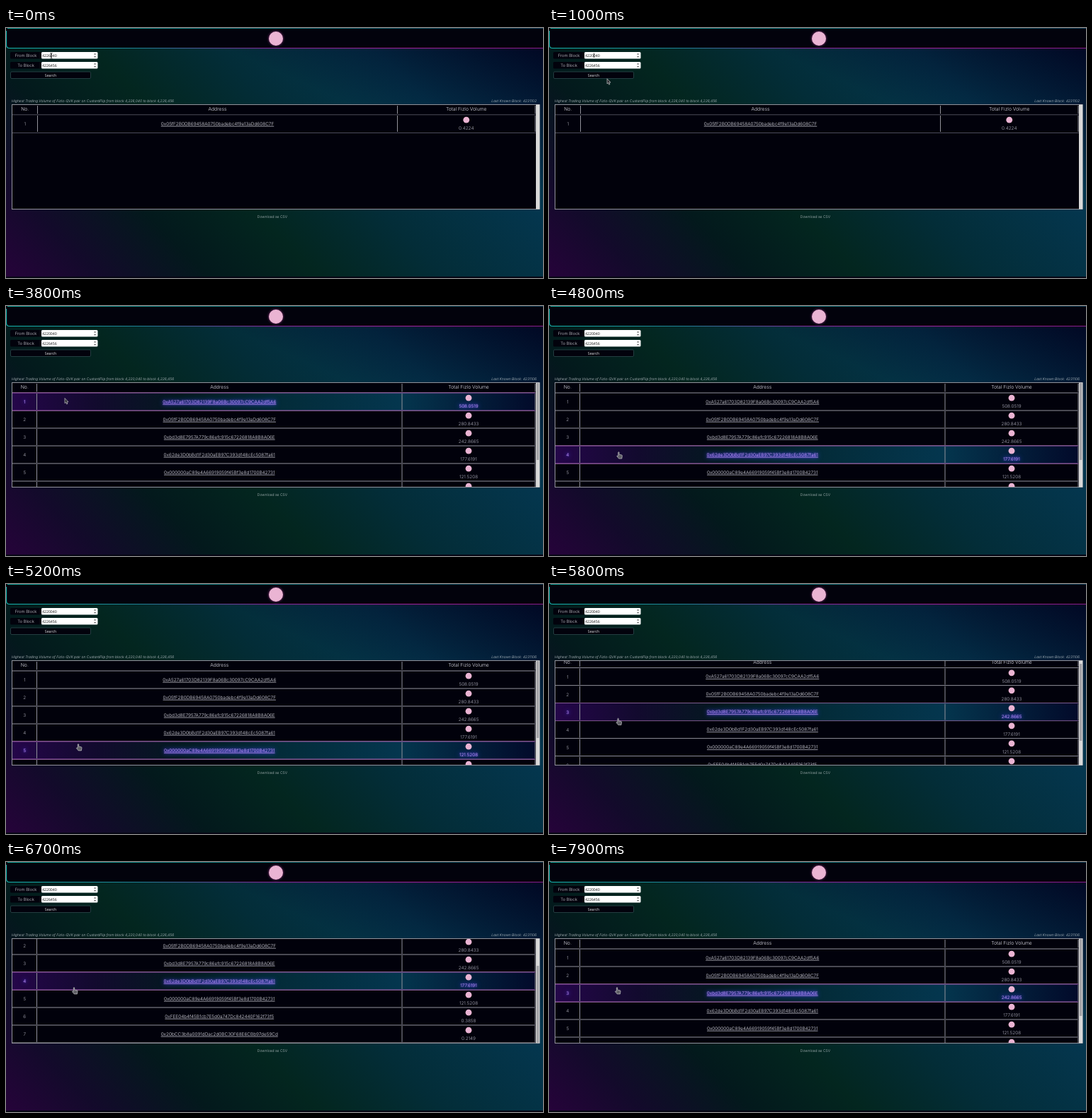
Recreate the animation shown at these times as an HTML page. Size 758 by 354 pixels, loop 8 s.

```html
<!DOCTYPE html>
<html lang="en">
<head>
<meta charset="utf-8">
<title>Trading volume search</title>
<style>
  html, body { margin: 0; width: 100%; height: 100%; overflow: hidden; background: #03151d; }
  svg { display: block; width: 758px; height: 354px; }
  text { font-family: Inter, "Open Sans", sans-serif; font-weight: 300; fill: #d6d6dc; text-rendering: geometricPrecision; }
  .head { font-size: 6.8px; fill: #e4e4e8; }
  .num { font-size: 6.4px; fill: #b4b4be; }
  .addr { font-size: 6.45px; fill: #e2e2e8; text-decoration: underline; text-decoration-thickness: .5px; }
  .label { font-size: 5.9px; }
  .field { font: 400 5.2px "Open Sans", "Noto Sans", sans-serif; fill: #111; }
  .note { font-size: 5px; font-style: italic; fill: #c4ccd0; }
  .small { font-size: 5.1px; fill: #b8c2c4; }
  .line { stroke: #92929a; stroke-width: 1; fill: none; }
  .dim { stroke: #4c4c58; }
  .token { fill: #eab4d3; }
  .glow { display: none; }
  .hover .glow { display: inline; }
  .hover text { fill: #cfa8ff; filter: drop-shadow(0 0 1px #7a45ff) drop-shadow(0 0 3px #3a45e8); }
</style>
</head>
<body>
<svg id="stage" viewBox="0 0 758 354" xmlns="http://www.w3.org/2000/svg">
  <defs>
    <linearGradient id="sky" gradientUnits="userSpaceOnUse" x1="101" y1="455" x2="657" y2="-101">
      <stop offset="0" stop-color="#26033a"/>
      <stop offset=".12" stop-color="#130a2b"/>
      <stop offset=".26" stop-color="#03191c"/>
      <stop offset=".4" stop-color="#03261f"/>
      <stop offset=".56" stop-color="#032d38"/>
      <stop offset=".76" stop-color="#04364e"/>
      <stop offset="1" stop-color="#03304a"/>
    </linearGradient>
    <linearGradient id="night" gradientUnits="userSpaceOnUse" x1="683" y1="197" x2="758" y2="30">
      <stop offset="0" stop-color="#010420" stop-opacity="0"/>
      <stop offset="1" stop-color="#010420" stop-opacity=".9"/>
    </linearGradient>
    <linearGradient id="edge" gradientUnits="userSpaceOnUse" x1="0" y1="0" x2="758" y2="0">
      <stop offset="0" stop-color="#15b5ac"/>
      <stop offset=".25" stop-color="#1f8296"/>
      <stop offset=".48" stop-color="#8a2a9c"/>
      <stop offset=".75" stop-color="#a8209a"/>
      <stop offset="1" stop-color="#8c1c88"/>
    </linearGradient>
    <linearGradient id="topEdge">
      <stop offset="0" stop-color="#15a59c"/>
      <stop offset="1" stop-color="#123a52"/>
    </linearGradient>
    <linearGradient id="rowFill">
      <stop offset="0" stop-color="#25064a"/>
      <stop offset=".16" stop-color="#120a2e"/>
      <stop offset=".32" stop-color="#03191f"/>
      <stop offset=".5" stop-color="#032b38"/>
      <stop offset=".74" stop-color="#04364e"/>
      <stop offset="1" stop-color="#020a2a"/>
    </linearGradient>
    <filter id="soft" x="-5%" y="-60%" width="110%" height="220%"><feGaussianBlur stdDeviation="1.2"/></filter>
    <filter id="halo" x="-50%" y="-50%" width="200%" height="200%"><feGaussianBlur stdDeviation="1.6"/></filter>
    <clipPath id="view"><rect x="8" y="108" width="740" height="149"/></clipPath>
  </defs>
</svg>
<script>
const stage = document.getElementById('stage');
const LOOP = 8000, STEP = 100, ROW_TOP = 123, ROW_H = 25, MAX_SCROLL = 42;

function add(parent, tag, attrs = {}, content) {
  const node = document.createElementNS('http://www.w3.org/2000/svg', tag);
  for (const key in attrs) node.setAttribute(key, attrs[key]);
  if (content !== undefined) node.textContent = content;
  parent.append(node);
  return node;
}
const group = (parent, attrs) => add(parent, 'g', attrs);
const rect = (parent, x, y, width, height, attrs) => add(parent, 'rect', { x, y, width, height, ...attrs });
const line = (parent, d, cls = 'line') => add(parent, 'path', { d, class: cls });
const token = (parent, cx, cy, r) => add(parent, 'circle', { cx, cy, r, class: 'token' });
const write = (parent, cls, x, y, content, anchor = 'middle') =>
  add(parent, 'text', { class: cls, x, y, 'text-anchor': anchor }, content);
const show = (node, on) => node.setAttribute('visibility', on ? 'visible' : 'hidden');

// Page and top bar
rect(stage, 0, 0, 758, 354, { fill: 'url(#sky)' });
rect(stage, 0, 0, 758, 354, { fill: 'url(#night)' });
rect(stage, 0, 352, 758, 2, { fill: '#070714' });
add(stage, 'path', { d: 'M0 0H758V28.5H5Q.5 28.5 .5 24V0Z', fill: '#02020c' });
add(stage, 'path', { d: 'M758 28.5H5Q.5 28.5 .5 24V4', fill: 'none', stroke: 'url(#edge)', 'stroke-width': 1.2 });
rect(stage, 2, 0, 756, 1, { fill: 'url(#topEdge)' });
add(stage, 'circle', { cx: 381, cy: 15, r: 10.6, fill: '#b0449a', opacity: .55, filter: 'url(#halo)' });
token(stage, 381, 15, 10);

// Search form
function field(y, label, value) {
  rect(stage, 6, y, 44, 9.5, { fill: '#02020c', rx: 1.5 });
  rect(stage, 50, y, 79.5, 9.5, { fill: '#fff', rx: 1.5 });
  write(stage, 'label', 28, y + 6.8, label);
  add(stage, 'path', { d: `M124 ${y + 3.6}l1.6-1.8 1.6 1.8zM124 ${y + 6}l1.6 1.8 1.6-1.8z`, fill: '#555' });
  return write(stage, 'field', 51, y + 6.8, value, 'start');
}
const fromValue = field(34, 'From Block', '4226040');
field(48, 'To Block', '4226456');
const caret = rect(stage, 63, 35.5, .8, 6.5, { fill: '#111' });
rect(stage, 6.5, 62, 113, 9.5, { fill: '#02020c', stroke: '#2c4a4c', 'stroke-width': .8, rx: 1.5 });
write(stage, 'field', 63, 68.7, 'Search').style.fill = '#eee';

// Table
const title = write(stage, 'note', 8, 104.6, '', 'start');
const known = write(stage, 'note', 749, 104.6, '', 'end');
rect(stage, 8, 108.5, 745, 148, { fill: '#01010b' });
const view = group(stage, { 'clip-path': 'url(#view)' });

function tableHead(parent, seams) {
  const [a, b] = seams;
  write(parent, 'head', (9 + a) / 2, 117, 'No.');
  write(parent, 'head', (a + b) / 2, 117, 'Address');
  write(parent, 'head', (b + 747) / 2, 117, 'Total Fizlo Volume');
  for (const x of [a, b, 747]) line(parent, `M${x} 110V121.5`);
}
function tableRow(parent, seams, index, [address, volume]) {
  const [a, b] = seams, y = ROW_TOP + index * ROW_H, row = group(parent);
  const glow = group(row, { class: 'glow' });
  rect(glow, 8, y, 739, ROW_H, { fill: 'url(#rowFill)' });
  for (const edge of [y, y + ROW_H])
    add(glow, 'path', { d: `M8 ${edge}H747v.01`, stroke: '#b765c4', 'stroke-width': 2, opacity: .75, filter: 'url(#soft)' });
  for (const x of [a, b, 747]) line(row, `M${x} ${y + 1}V${y + ROW_H - 1}`);
  write(row, 'num', (9 + a) / 2, y + 15, index + 1);
  write(row, 'addr', (a + b) / 2, y + 14.8, address);
  const cx = (b + 747) / 2;
  token(row, cx, y + 7.2, 4.4);
  write(row, 'num', cx, y + 21.3, volume);
  return row;
}

const before = group(view);
const firstSeams = [44.5, 552.5];
line(before, 'M8 122.8H748M8 148.5H748', 'line dim');
tableHead(before, firstSeams);
tableRow(before, firstSeams, 0, ['0x05fF2B0DB69458A0750badebc4f9e13aDd608C7F', '0.4224']);

const loading = group(view);
line(loading, 'M8 122.8H748', 'line dim');
tableHead(loading, [91.5, 295.5]);
token(loading, 378, 189.5, 18);

const results = group(view);
const seams = [43.5, 559];
const rows = [
  ['0xA527a61703D82139F8a06Bc30097cC9CAA2df5A6', '508.0519'],
  ['0x05fF2B0DB69458A0750badebc4f9e13aDd608C7F', '280.8433'],
  ['0xbd3d8E7957A779c86efc915c67226818A8B8A06E', '242.8665'],
  ['0x62de3D0bBd1F2d30aEB97C393d148cEc5087fa61', '177.6191'],
  ['0x000000aC89e4A66919059f45Bf3e8d1700B42731', '121.5208'],
  ['0xFEE04b4f45B1cb7E5d0a747Dc842440F162f73f5', '0.3858'],
  ['0x20bCC3b8a0091dDac2d0BC30F68E6CBb97de59Cd', '0.2149']
];
for (let i = 0; i <= rows.length; i++) line(results, `M8 ${ROW_TOP + i * ROW_H}H748`);
tableHead(results, seams);
const rowNodes = rows.map((row, i) => tableRow(results, seams, i, row));

rect(stage, 8.5, 108.5, 744.5, 148, { class: 'line' });
rect(stage, 748, 108.5, 5.3, 148, { fill: '#d9d9d9' });
const thumb = rect(stage, 749, 109, 3.3, 109, { fill: '#a4a4a8', rx: .5 });
const download = write(stage, 'small', 376, 268.8, 'Download as CSV');

// Pointers, each with its hot spot at 0,0
const ink = { fill: '#2c2c30', stroke: '#c4c4c8', 'stroke-width': .7, 'stroke-linejoin': 'round' };
const pointers = {
  beam: add(stage, 'path', { d: 'M-1.5-4Q0-4 0-3Q0-4 1.5-4M0-3V3M-1.5 4Q0 4 0 3Q0 4 1.5 4', fill: 'none', stroke: '#222', 'stroke-width': .8 }),
  arrow: add(stage, 'path', { d: 'M0 0V7.2L1.6 5.8 2.7 8.4 3.9 7.9 2.8 5.3H5Z', ...ink }),
  hand: add(stage, 'path', { d: 'M-.7.5Q0-.5.7.5V3.6L4.2 4.3Q5 4.5 5 5.5L4.4 9.4H.2L-2.6 6Q-2.6 4.8-.7 5.8Z', ...ink, fill: '#606066' })
};

// time, x, y
const path = [
  [0, 64, 39.5], [600, 64, 39.5], [1000, 82, 71.8], [1300, 97, 68], [3300, 97, 68],
  [3800, 83, 130.5], [4200, 88, 150], [5100, 102, 226.5], [5400, 102, 226.5],
  [6000, 96, 177.5], [8000, 96, 177.5]
];
// time, offset
const scrolling = [[0, 0], [5700, 0], [6200, MAX_SCROLL], [6900, MAX_SCROLL], [7400, 0], [8000, 0]];

function sample(keys, t) {
  const i = Math.max(1, keys.findIndex(k => k[0] > t));
  const a = keys[i - 1], b = keys[i];
  const p = (t - a[0]) / (b[0] - a[0]), e = p * p * (3 - 2 * p);
  return a.slice(1).map((v, n) => v + (b[n + 1] - v) * e);
}

function draw(t) {
  const [x, y] = sample(path, t), [scroll] = sample(scrolling, t);
  const isLoading = t >= 1700 && t < 3500, isDone = t >= 3500;

  fromValue.textContent = t < 300 ? '4226040' : t < 600 ? '422040' : '4220040';
  caret.setAttribute('x', t >= 300 && t < 600 ? 60 : 63);
  show(caret, t < 1600);
  title.textContent = `Highest Trading Volume of Fizlo-QVK pair on CustardFlip from block ${t < 1700 ? '4,226,040' : '4,220,040'} to block 4,226,456`;
  known.textContent = 'Last Known Block: ' + (isDone ? '4231106' : '4231102');

  show(before, t < 1700);
  show(loading, isLoading);
  show(results, isDone);
  show(download, !isLoading);
  show(thumb, isDone);
  results.setAttribute('transform', `translate(0 ${-scroll})`);
  thumb.setAttribute('y', 109 + scroll / MAX_SCROLL * 38);

  const over = isDone && y > 109 ? Math.floor((y + scroll - ROW_TOP) / ROW_H) : -1;
  rowNodes.forEach((row, i) => row.classList.toggle('hover', i === over));

  const kind = t < 700 ? 'beam' : t < 1100 || (t >= 3400 && t < 4000) ? 'arrow' : 'hand';
  for (const name in pointers) {
    show(pointers[name], name === kind);
    pointers[name].setAttribute('transform', `translate(${x} ${y})`);
  }
}

const start = performance.now();
function tick() {
  const t = (performance.now() - start) % LOOP;
  draw(Math.floor(t / STEP) * STEP);
  requestAnimationFrame(tick);
}
tick();
</script>
</body>
</html>
```
